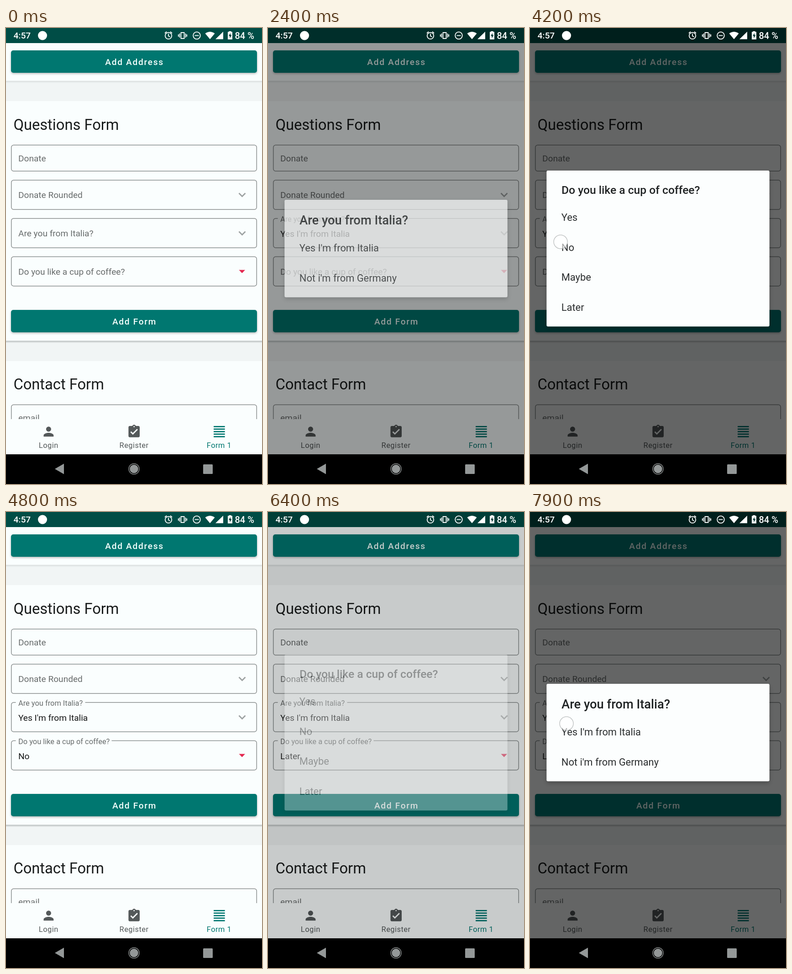
Write an HTML page that moves like this. It is 561x998 px and loops after 8 s.

```html
<!DOCTYPE html>
<html lang="en">
<head>
<meta charset="utf-8">
<title>Form dialogs</title>
<style>
  html, body { margin: 0; width: 100%; height: 100%; overflow: hidden; background: #000; }
  svg { display: block; width: 100%; height: 100%; font-family: Roboto, "Open Sans", sans-serif; }
  .heading { font-size: 32.7px; fill: #191c1c; }
  .label { fill: #686c6c; }
  .value { font-size: 19.1px; fill: #151717; }
  .button { font-size: 19.1px; font-weight: 500; letter-spacing: 1.7px; fill: #f4fffd; text-anchor: middle; }
  .tab { font-size: 16.4px; letter-spacing: .5px; text-anchor: middle; }
  .title { font-weight: 500; fill: #202324; }
  .item { font-size: 21.85px; fill: #2b2e2f; }
  .status { font-weight: 500; fill: #fff; }
</style>
</head>
<body>
<svg id="stage" viewBox="0 0 561 998">
  <defs>
    <filter id="soft" x="-10%" y="-10%" width="120%" height="130%">
      <feDropShadow dx="0" dy="2" stdDeviation="2" flood-opacity=".28"/>
    </filter>
    <filter id="lift" x="-10%" y="-10%" width="120%" height="125%">
      <feDropShadow dx="0" dy="4" stdDeviation="5" flood-opacity=".25"/>
    </filter>
    <clipPath id="content"><rect y="33" width="561" height="823"/></clipPath>
  </defs>

  <rect width="561" height="998" fill="#f1f5f5"/>
  <g id="page" clip-path="url(#content)"></g>

  <g id="tabs">
    <rect y="856" width="561" height="77" fill="#fafefe"/>
    <g fill="#54595a">
      <path transform="translate(77 867) scale(1.365)" d="M12 12c2.21 0 4-1.79 4-4s-1.79-4-4-4-4 1.79-4 4 1.79 4 4 4zm0 2c-2.67 0-8 1.34-8 4v2h16v-2c0-2.66-5.33-4-8-4z"/>
      <path transform="translate(264.3 867) scale(1.365)" d="M19 3h-4.18C14.4 1.84 13.3 1 12 1c-1.3 0-2.4.84-2.82 2H5c-1.1 0-2 .9-2 2v14c0 1.1.9 2 2 2h14c1.1 0 2-.9 2-2V5c0-1.1-.9-2-2-2zm-7 0c.55 0 1 .45 1 1s-.45 1-1 1-1-.45-1-1 .45-1 1-1zm-2 14l-4-4 1.41-1.41L10 14.17l6.59-6.59L18 9l-8 8z"/>
      <text class="tab" x="93.3" y="919">Login</text>
      <text class="tab" x="280.6" y="919">Register</text>
    </g>
    <path transform="translate(451 867) scale(1.365)" d="M3 4h18M3 8h18M3 12h18M3 16h18M3 20h18" stroke="#007770" stroke-width="2"/>
    <text class="tab" x="467" y="919" fill="#007770">Form 1</text>
  </g>

  <rect width="561" height="33" fill="#004d46"/>
  <rect id="dim" width="561" height="933"/>

  <g id="statusBar" fill="#fff" stroke-width="1.8">
    <text class="status" x="16.5" y="23" font-size="19.1">4:57</text>
    <circle cx="80" cy="16.5" r="10"/>
    <g fill="none" stroke="#fff">
      <circle cx="356" cy="17" r="7.2"/>
      <path d="M356 12.5v5l3.5 2M348 11.5l4-3.5m12 3.5l-4-3.5"/>
      <path d="M383.5 10h7v13h-7zM380.5 12v9m13-9v9M377.8 14v5m18.4-5v5"/>
      <circle cx="418" cy="16.5" r="7.8"/>
      <path d="M413.5 16.5h9"/>
    </g>
    <path d="M436.5 12Q447 4.5 457.5 12L447 24.5zM459 24.5h17V8z"/>
    <path d="M488.5 8.5V7h5v1.5h2.5V25h-10V8.5z"/>
    <path d="M492 11l-4 6.5h2.5v5l4-7H492z" fill="#00332f"/>
    <text class="status" x="501.5" y="23.5" font-size="20">84 %</text>
  </g>

  <rect y="933" width="561" height="65"/>
  <g fill="#949898">
    <path d="M107 965l20-11.5v23z"/>
    <circle cx="280.5" cy="965" r="9.3"/>
    <circle cx="280.5" cy="965" r="11.5" fill="none" stroke="#949898" stroke-width="1.4"/>
    <rect x="432" y="955" width="21" height="21" rx="1.5"/>
  </g>

  <g id="dialogs"></g>
  <circle id="touch" r="15" fill="#fff" fill-opacity=".6" stroke="#b4b8b8" stroke-opacity=".8" stroke-width="1.5"/>
</svg>

<script>
const LOOP = 8000, STEP = 100;
const SURFACE = '#fafefe';
const byId = id => document.getElementById(id);

function add(parent, tag, attrs, text) {
  const node = document.createElementNS('http://www.w3.org/2000/svg', tag);
  set(node, attrs);
  if (text) node.textContent = text;
  parent.append(node);
  return node;
}
function set(node, attrs) {
  for (const key in attrs) node.setAttribute(key, attrs[key]);
}
const clamp = v => Math.max(0, Math.min(1, v));

const page = byId('page');
const card = (y, height) =>
  add(page, 'rect', { x: -4, y, width: 569, height, rx: 4, fill: SURFACE });
const heading = (y, text) => add(page, 'text', { class: 'heading', x: 16.4, y }, text);

function cardEdge(y, opacity) {
  add(page, 'path', { d: `M0 ${y}H561`, stroke: '#8d9494', 'stroke-width': 2, opacity });
  add(page, 'path', { d: `M0 ${y + 2}H561`, stroke: '#8d9494', 'stroke-width': 3, opacity: opacity * .35 });
}

function button(y, text) {
  add(page, 'rect', { x: 11, y, width: 539, height: 49, rx: 5, fill: '#007770', filter: 'url(#soft)' });
  add(page, 'text', { class: 'button', x: 281.5, y: y + 32 }, text);
}

// Returns an updater: lift moves the label from inside the box onto its border.
function field(y, height, text, floatWidth = 0) {
  add(page, 'rect', { x: 11.7, y, width: 537.6, height, rx: 5, fill: 'none', stroke: '#8b9090', 'stroke-width': 1.5 });
  const notch = add(page, 'rect', { x: 21.5, y: y - 2, width: floatWidth, height: 4, fill: SURFACE });
  const label = add(page, 'text', { class: 'label', x: 27 }, text);
  const value = add(page, 'text', { class: 'value', x: 27, y: y + 40 });
  const restY = y + height / 2 + 7;
  const update = (lift, content) => {
    set(label, { y: restY + (y + 7 - restY) * lift, 'font-size': 19.1 - 2.7 * lift });
    set(notch, { opacity: lift > .4 ? 1 : 0 });
    value.textContent = content;
  };
  update(0, '');
  return update;
}

const chevron = y =>
  add(page, 'path', { d: `M510.5 ${y - 3.5}l7 7 7-7`, fill: 'none', stroke: '#9da2a2', 'stroke-width': 2.8 });

card(20, 96);
cardEdge(116.5, .2);
button(49, 'Add Address');
card(160, 525);
cardEdge(685.5, .5);
heading(222.5, 'Questions Form');
field(256.3, 57, 'Donate');
field(333, 64.2, 'Donate Rounded');
const country = field(416.8, 64.2, 'Are you from Italia?', 152);
const coffee = field(500.6, 64.2, 'Do you like a cup of coffee?', 210);
chevron(365);
chevron(449);
add(page, 'path', { d: 'M510.5 529.5h13.5l-6.7 7z', fill: '#e4274f' });
button(617, 'Add Form');
card(729, 200);
heading(790.5, 'Contact Form');
field(824.6, 57, 'email');

function dialog(y, height, title, titleSize, items) {
  const group = add(byId('dialogs'), 'g', {});
  const titleY = y + 26.5 + titleSize;
  const itemsY = y + 85.7 + titleSize;
  add(group, 'rect', { x: 36.3, y, width: 488.4, height, rx: 3, fill: '#fcfefe', filter: 'url(#lift)' });
  add(group, 'text', { class: 'title', x: 69, y: titleY, 'font-size': titleSize }, title);
  items.forEach((item, i) =>
    add(group, 'text', { class: 'item', x: 68.8, y: itemsY + i * 65.5 }, item));
  return (opacity, scale) => {
    const cy = y + height / 2;
    set(group, {
      opacity,
      visibility: opacity ? 'visible' : 'hidden',
      transform: `translate(280.5 ${cy}) scale(${scale}) translate(-280.5 ${-cy})`
    });
  };
}

const countryDialog = dialog(376, 213.3, 'Are you from Italia?', 27.3,
  ["Yes I'm from Italia", "Not i'm from Germany"]);
const coffeeDialog = dialog(312, 341.3, 'Do you like a cup of coffee?', 24.6,
  ['Yes', 'No', 'Maybe', 'Later']);

const FADE = 300;
const visits = [
  { show: countryDialog, open: 1200, close: 2300 },
  { show: coffeeDialog, open: 3200, close: 4200 },
  { show: coffeeDialog, open: 5100, close: 6200 },
  { show: countryDialog, open: 7200, close: LOOP }
];
const touches = [
  [1100, 62, 452], [2200, 80, 486], [3200, 79, 553], [4200, 67, 468],
  [5000, 66, 535], [6200, 78, 606], [7100, 37, 433], [7900, 80, 463]
];

function render(time) {
  const t = Math.floor(time / STEP) * STEP;

  country(clamp((t - 2200) / 200), t >= 2300 ? "Yes I'm from Italia" : '');
  coffee(clamp((t - 4200) / 200), t >= 6300 ? 'Later' : t >= 4300 ? 'No' : '');

  countryDialog(0, 1);
  coffeeDialog(0, 1);
  let shade = 0;
  for (const { show, open, close } of visits) {
    if (t <= open || t >= close + FADE) continue;
    const enter = clamp((t - open) / FADE);
    shade = enter * (1 - clamp((t - close) / FADE));
    show(shade, .92 + .08 * (1 - (1 - enter) ** 2));
  }
  set(byId('dim'), { opacity: .6 * shade });

  const tap = touches.find(([start]) => t >= start && t < start + 200);
  set(byId('touch'), tap
    ? { cx: tap[1], cy: tap[2], visibility: 'visible' }
    : { visibility: 'hidden' });
}

const start = performance.now();
function tick() {
  render((performance.now() - start) % LOOP);
  requestAnimationFrame(tick);
}
tick();
</script>
</body>
</html>
```
